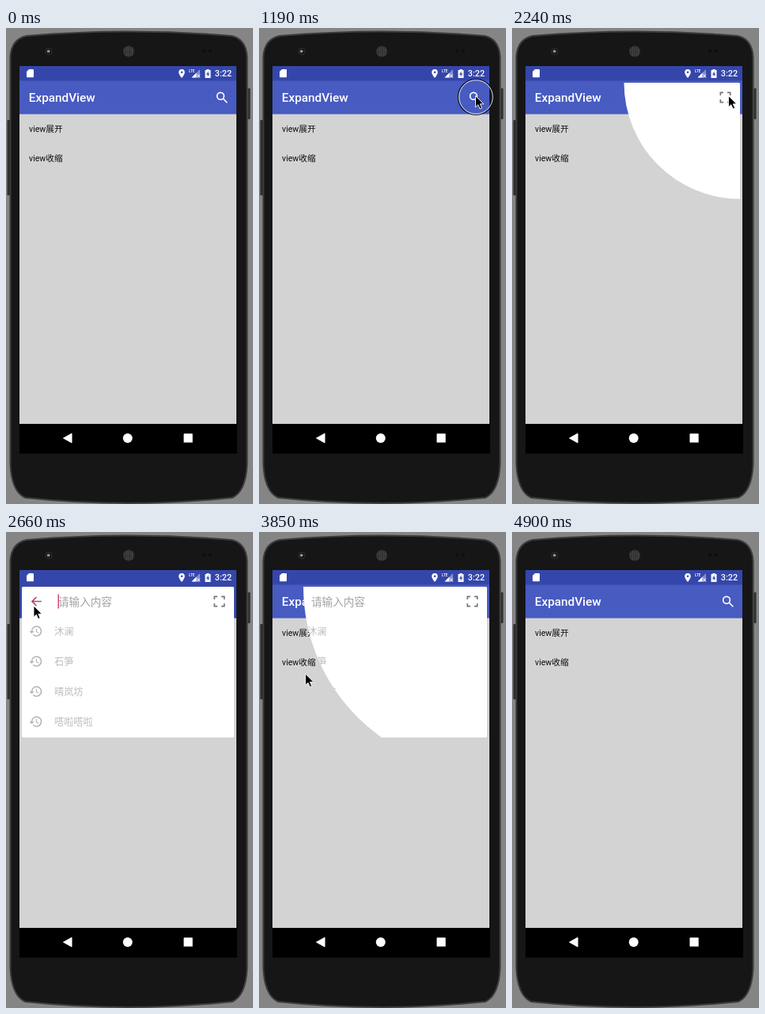
Write an HTML page that moves like this. It is 312 px wide and 600 px high and loops after 4.97 s.

```html
<!DOCTYPE html>
<html lang="zh-CN">
<head>
<meta charset="utf-8">
<title>Expanding search</title>
<style>
html, body { margin: 0; width: 100%; height: 100%; overflow: hidden; background: #858585; }
svg { display: block; width: 312px; height: 600px; }
text { font-family: Roboto, "Noto Sans CJK SC", "Noto Sans CJK", sans-serif; }
.bold { font-weight: 500; fill: #fff; }
.item { font-size: 10.6px; fill: #0c0c0c; }
.past { font-size: 12.2px; fill: #bdbdbd; }
</style>
</head>
<body>
<svg viewBox="0 0 312 600">
  <defs>
    <linearGradient id="back">
      <stop offset=".3" stop-color="#b8455f"/>
      <stop offset=".75" stop-color="#757575"/>
    </linearGradient>
    <pattern id="mesh" width="2.4" height="2.4" patternUnits="userSpaceOnUse">
      <circle cx="1.2" cy="1.2" r=".8" fill="#5a5a5a"/>
    </pattern>
    <clipPath id="reveal"><circle id="hole" cx="288" cy="69" r="0"/></clipPath>
    <path id="clock" d="M13 3a9 9 0 0 0-9 9H1l3.9 3.9.1.1L9 12H6a7 7 0 1 1 2.06 4.94l-1.42 1.42A9 9 0 1 0 13 3zm-1 5v5l4.28 2.54.72-1.21-3.5-2.08V8z" fill="#b4b4b4"/>
  </defs>

  <!-- phone -->
  <rect width="312" height="600" fill="#858585"/>
  <path d="M5.500 36Q7 14 26 10Q155 -1 285 10Q303 14 304.500 36V550Q303 584 286 592Q155 606 24 592Q7 584 5.500 550Z" fill="#161616" stroke="#3c3c3c" stroke-width="2"/>
  <rect x="1.500" y="116" width="3.500" height="95" rx="1" fill="#303030"/>
  <rect x="305.500" y="76" width="3" height="39" rx="1" fill="#303030"/>
  <circle cx="54" cy="29.500" r="4" fill="#0d0d10" stroke="#383838"/>
  <circle cx="53.700" cy="29.300" r="1.900" fill="#8d929c"/>
  <circle cx="155" cy="29.500" r="7" fill="#262626"/>
  <circle cx="155" cy="29.500" r="7" fill="url(#mesh)"/>
  <circle cx="250" cy="29" r="2.300" fill="#0f0f0f"/>
  <circle cx="258" cy="29" r="2" fill="#0f0f0f"/>

  <!-- screen -->
  <rect x="17" y="48" width="274" height="488" fill="#d3d3d3"/>
  <rect id="bar" x="17" y="66" width="274" height="42.600" fill="#485bc1"/>
  <rect x="17" y="48" width="274" height="18.500" fill="#3546aa"/>
  <rect x="17" y="499" width="275" height="37.500" fill="#000"/>
  <g fill="#fff">
    <path d="M72.500 517L83 511.200V522.800Z" stroke="#fff" stroke-linejoin="round"/>
    <circle cx="153.700" cy="517" r="6"/>
    <rect x="224.500" y="511.300" width="11.200" height="11.200" rx=".6"/>
    <path d="M29 52H34Q35 52 35 53V61.300Q35 62.300 34 62.300H27Q26 62.300 26 61.300V55Z"/>
    <path fill-rule="evenodd" d="M222 52A3.800 3.800 0 0 0 218.200 55.800C218.200 58.700 222 63 222 63S225.800 58.700 225.800 55.800A3.800 3.800 0 0 0 222 52ZM222 54.500a1.300 1.300 0 1 1 0 2.600a1.300 1.300 0 1 1 0-2.600Z"/>
    <path d="M245 52V62.500H234.500Z" opacity=".4"/>
    <path d="M240.500 56.500V62.500H234.500Z"/>
    <path d="M241.500 58.500L245 62.500M245 58.500L241.500 62.500" stroke="#fff"/>
    <path d="M253.500 52H256.500V53H258.500V63H251.500V53H253.500Z"/>
    <path d="M255.600 54.500L253 58.700H254.700V61.500L257.200 57.400H255.600Z" fill="#3546aa"/>
  </g>
  <text class="bold" x="231" y="56" font-size="4.600" font-weight="700">LTE</text>
  <text class="bold" x="263.800" y="61.200" font-size="10.800">3:22</text>
  <text class="bold" x="28.800" y="92.900" font-size="15.300">ExpandView</text>
  <g transform="translate(263.400 78.200) scale(.8)" fill="none" stroke="#fff" stroke-width="2">
    <circle cx="9.500" cy="9.500" r="5.500"/>
    <path d="M13.700 13.700L20 20"/>
  </g>
  <text class="item" x="29" y="131">view展开</text>
  <text class="item" x="29" y="167.500">view收缩</text>

  <!-- search card -->
  <g id="card" clip-path="url(#reveal)">
    <rect x="20" y="69" width="268" height="190" rx="1.500" fill="#fff"/>
    <path d="M45 87.500H33M38.500 82L33 87.500L38.500 93" fill="none" stroke="url(#back)" stroke-width="1.700"/>
    <text x="66" y="92.600" font-size="13.600" fill="#a3a3a3">请输入内容</text>
    <rect id="caret" x="65.500" y="78.500" width="1.500" height="18" fill="#d9486e"/>
    <path d="M263.300 85V81.300H267M272 81.300H275.700V85M275.700 90V93.700H272M267 93.700H263.300V90" fill="none" stroke="#777" stroke-width="1.700"/>
    <g id="rows"></g>
  </g>

  <!-- pointer -->
  <g id="pointer">
    <g id="ring" fill="none">
      <circle cx=".5" cy="1.500" r="22.500" stroke="#111" stroke-width="1.200"/>
      <circle cx=".5" cy="1.500" r="21.300" stroke="#dfe2ee"/>
    </g>
    <path d="M0 0V14.300L3.300 11.200L5.700 16.500L8.100 15.400L5.800 10.300H10.300Z" fill="#000" stroke="#fff" stroke-width=".9"/>
  </g>
</svg>
<script>
const LOOP = 4970, STEP = 70, FULL = 328;
const OPEN = 2007, CLOSE = 3668, SPAN = 500;
// time, x, y of the pointer tip
const path = [
  [840, 294, 152], [910, 288, 122], [980, 278, 94], [1050, 273.5, 85.5],
  [2240, 273.5, 85.5], [2590, 35, 93], [2940, 35, 93], [3080, 36, 85],
  [3710, 36, 85], [4060, 101.5, 356.5], [4550, 96, 560], [4690, 94, 602]
];
const presses = [[1120, 1960], [3150, 3500]];
const history = ["沐澜", "石笋", "晴岚坊", "嗒啦嗒啦"];

const $ = id => document.getElementById(id);
const show = (id, on) => $(id).setAttribute("visibility", on ? "inherit" : "hidden");
const within = (t, a, b) => t >= a && t < b;
const ease = p => (1 - Math.cos(Math.PI * Math.min(1, Math.max(0, p)))) / 2;

$("rows").innerHTML = history.map((name, i) => {
  const y = 125 + 38 * i;
  return `<use href="#clock" transform="translate(28.800 ${y - 9}) scale(.75)"/>
    <text class="past" x="61" y="${y + 4.5}">${name}</text>`;
}).join("");

function pointerAt(t) {
  const i = path.findIndex(k => k[0] > t);
  if (i < 1) return null;
  const [t0, x0, y0] = path[i - 1], [t1, x1, y1] = path[i];
  const raw = (t - t0) / (t1 - t0);
  const p = t1 - t0 > 300 ? ease(raw) : raw;
  return [x0 + (x1 - x0) * p, y0 + (y1 - y0) * p];
}

function draw(time) {
  const t = Math.floor((time % LOOP) / STEP) * STEP;
  const size = ease((t - OPEN) / SPAN) - ease((t - CLOSE) / SPAN);
  $("hole").setAttribute("r", FULL * size);
  show("card", size > 0.001);
  $("bar").setAttribute("fill", size > 0.999 ? "#3546aa" : "#485bc1");
  show("caret", within(t, 2590, 3090));

  const at = pointerAt(t);
  $("pointer").setAttribute("visibility", at ? "visible" : "hidden");
  if (at) $("pointer").setAttribute("transform", `translate(${at})`);
  show("ring", presses.some(([a, b]) => within(t, a, b)));
}

const start = performance.now();
function tick() {
  draw(performance.now() - start);
  requestAnimationFrame(tick);
}
tick();
</script>
</body>
</html>
```
